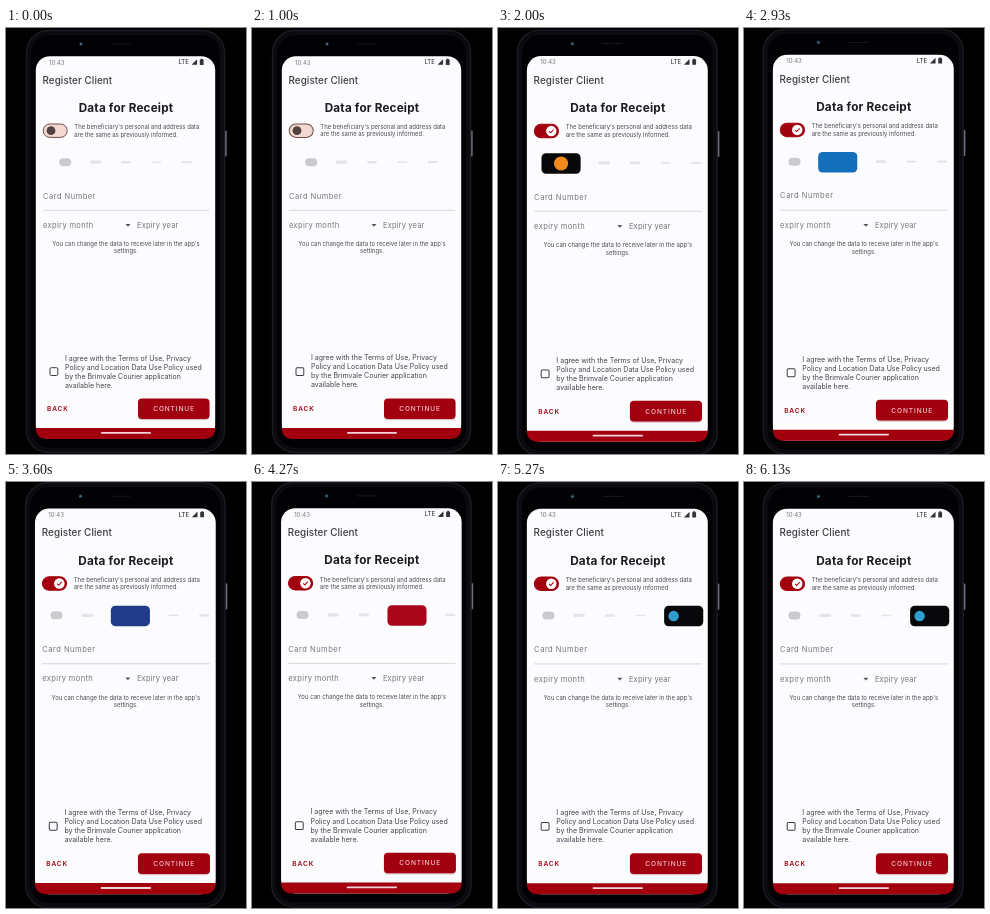
These frames come from a looping animation (240 by 426 pixels, 6.19 s). An HTML page:

```html
<!DOCTYPE html>
<html lang="en">
<head>
<meta charset="utf-8">
<title>Register Client</title>
<style>
  html, body { margin: 0; width: 100%; height: 100%; overflow: hidden; background: #000; }
  svg { display: block; width: 100vw; height: 100vh; }
  text { font-family: Inter, "Open Sans", sans-serif; fill: #3c3c44; white-space: pre; }
  .small { font-size: 5.95px; fill: #4c4c54; }
  .field { font-size: 7.5px; fill: #77777d; }
  .terms { font-size: 7px; fill: #44444c; }
  .action { font-size: 6.5px; font-weight: 600; letter-spacing: .9px; }
</style>
</head>
<body>
<svg viewBox="0 0 240 426">
  <rect width="240" height="426"/>
  <g id="phone">
    <path d="M218.3 102.5h1.4q1 0 1 1v24q0 1-1 1h-1.4z" fill="#6c6d78"/>
    <rect x="20.5" y="2.5" width="198" height="422" rx="22" fill="#0b0b0f" stroke="#1b1c24" stroke-width="1.4"/>
    <rect x="24.5" y="6.5" width="190" height="414" rx="19" fill="#020204" stroke="#0f1016" stroke-width=".8"/>
    <circle cx="75" cy="16" r="2.4" fill="#0c1118"/>
    <circle cx="75" cy="16" r="1.3" fill="#3a6b7c"/>
    <rect x="105" y="15.4" width="20" height="1.2" rx=".6" fill="#15161b"/>
    <rect x="29.8" y="28.2" width="179.4" height="382.8" rx="14" fill="#fcfbfd"/>
    <path d="M29.8 400h179.4q0 11-12 11h-155.4q-12 0-12-11z" fill="#a3000f"/>
    <rect x="95" y="404" width="50" height="1.8" rx=".9" fill="#f2d5d8"/>

    <text x="43" y="36.6" font-size="6" style="fill:#77777d">10:43</text>
    <text x="172.5" y="36.4" font-size="6" font-weight="500">LTE</text>
    <path d="M185.5 36.8h5.6v-5.6zM193.8 31.6h1v-.8h1.8v.8h1v5.3h-3.8z" fill="#33333a"/>

    <text x="36.5" y="55.7" font-size="9.8" font-weight="500" letter-spacing=".1">Register Client</text>
    <text x="120" y="84.1" font-size="11.7" font-weight="700" letter-spacing=".2" text-anchor="middle" style="fill:#1b1b20">Data for Receipt</text>

    <rect id="track" x="37.2" y="96" width="24" height="13.4" rx="6.7"/>
    <circle id="thumb" cy="102.7"/>
    <path id="check" d="M51.8 102.8l1.6 1.6 3-3.3" fill="none" stroke="#a3000f"/>
    <text class="small" x="68.3" y="101">The beneficiary's personal and address data</text>
    <text class="small" x="68.3" y="108.5">are the same as previously informed.</text>

    <g id="cards"></g>

    <text class="field" x="37" y="170.7" letter-spacing=".5">Card Number</text>
    <path d="M37 182.3H203" stroke="#cfcdd2" stroke-width=".8"/>
    <text class="field" x="37" y="199.8" letter-spacing=".35">expiry month</text>
    <path d="M119.5 196h5l-2.5 2.7z" fill="#55555c"/>
    <text class="field" x="131" y="199.8" letter-spacing=".15">Expiry year</text>
    <text class="small" x="120" y="218" text-anchor="middle">You can change the data to receive later in the app's</text>
    <text class="small" x="120" y="225.4" text-anchor="middle">settings.</text>

    <rect x="44" y="339.7" width="7.8" height="7.8" rx="1.2" fill="none" stroke="#3c3c42" stroke-width="1"/>
    <g id="terms"></g>
    <text class="action" x="41" y="383.2" style="fill:#a3000f">BACK</text>
    <rect x="132" y="371.2" width="71.5" height="21" rx="4" fill="#702030" opacity=".25"/>
    <rect x="132" y="370.4" width="71.5" height="20.6" rx="4" fill="#a3000f"/>
    <text class="action" x="168" y="383" text-anchor="middle" style="fill:#f0c8cc;font-weight:500">CONTINUE</text>
  </g>
</svg>
<script>
const LOOP = 6190, TOGGLE_AT = 1400, PITCH = 30.4, GROW = 25, ROW_Y = 134.8;
const RED = [163, 0, 15];
const $ = id => document.getElementById(id);
const make = (parent, tag, attrs = {}) => {
  const el = document.createElementNS('http://www.w3.org/2000/svg', tag);
  set(el, attrs);
  return parent.appendChild(el);
};
function set(el, attrs) {
  for (const key in attrs) el.setAttribute(key, attrs[key]);
}
const mix = (a, b, k) => a + (b - a) * k;
const ease = (t, start, span = 200) => {
  const k = Math.min(1, Math.max(0, (t - start) / span));
  return k * k * (3 - 2 * k);
};
const blend = (a, b, k) => `rgb(${a.map((v, i) => Math.round(mix(v, b[i], k)))})`;

['I agree with the Terms of Use, Privacy', 'Policy and Location Data Use Policy used',
 'by the Brimvale Courier application', 'available here.'].forEach((line, i) => {
  make($('terms'), 'text', { class: 'terms', x: 59, y: 332.5 + 9 * i }).textContent = line;
});

// Each card: selection time, fill, idle mark size, optional badge
const cards = [
  { at: 1700, fill: '#08080a', idle: [12, 8], badge: ['#f08a1d', 0, 7] },
  { at: 2500, fill: '#1470bd', idle: [11, 3.2] },
  { at: 3300, fill: '#203c88', idle: [10, 2.6] },
  { at: 4000, fill: '#a8061a', idle: [10, 1.6] },
  { at: 4800, fill: '#08080a', idle: [10, 2.2], badge: ['#2e9fd0', -10, 5.2] }
];
cards.forEach((card, i) => {
  const [w, h] = card.idle;
  card.group = make($('cards'), 'g');
  card.mark = make(card.group, 'rect', {
    x: -w / 2, y: -h / 2 - .6, width: w, height: h, rx: i ? .8 : 4, fill: i ? '#e5e4e8' : '#cbcace'
  });
  card.face = make(card.group, 'g');
  make(card.face, 'rect', { x: -19.4, y: -10.2, width: 38.8, height: 20.4, rx: 4.5, fill: card.fill });
  if (card.badge) {
    const [fill, cx, r] = card.badge;
    make(card.face, 'circle', { cx, r, fill });
  }
});

// Slight drift of the phone: time, offset near the top, offset near the bottom, widening
const drift = [
  [0, 0, 0, 0], [1000, 0, 0, 0], [2000, 0, 2.5, 1], [2930, -1.2, 1.5, 1],
  [4270, -1.8, .3, .8], [5270, -1.3, 1, 1], [LOOP, -1.3, 1, 1]
];
function movePhone(t) {
  const i = drift.findIndex(key => key[0] > t);
  const a = drift[i - 1], b = drift[i], k = (t - a[0]) / (b[0] - a[0]);
  const [top, bottom, wide] = [1, 2, 3].map(n => mix(a[n], b[n], k));
  const sx = 1 + .0085 * wide, sy = 1 + (bottom - top) / 328;
  set($('phone'), { transform: `matrix(${sx} 0 0 ${sy} ${140 * (1 - sx)} ${top - 52 * (sy - 1)})` });
}

function moveToggle(t) {
  const on = ease(t, TOGGLE_AT);
  set($('track'), { fill: blend([241, 216, 208], RED, on), stroke: blend([112, 78, 76], RED, on) });
  set($('thumb'), { cx: mix(45, 54, on), r: mix(4.4, 5.2, on), fill: blend([82, 66, 66], [255, 255, 255], on) });
  set($('check'), { opacity: on });
}

function moveCards(t) {
  let x = mix(44, 36, ease(t, cards[0].at));
  cards.forEach((card, i) => {
    const next = cards[i + 1];
    const open = ease(t, card.at) - (next ? ease(t, next.at) : 0);
    const width = PITCH + GROW * open;
    set(card.group, { transform: `translate(${x + width / 2} ${ROW_Y})` });
    set(card.face, { transform: `scale(${mix(.3, 1, open)})`, opacity: open });
    set(card.mark, { opacity: 1 - open });
    x += width;
  });
}

function draw() {
  const t = performance.now() % LOOP;
  movePhone(t);
  moveToggle(t);
  moveCards(t);
  requestAnimationFrame(draw);
}
draw();
</script>
</body>
</html>
```
